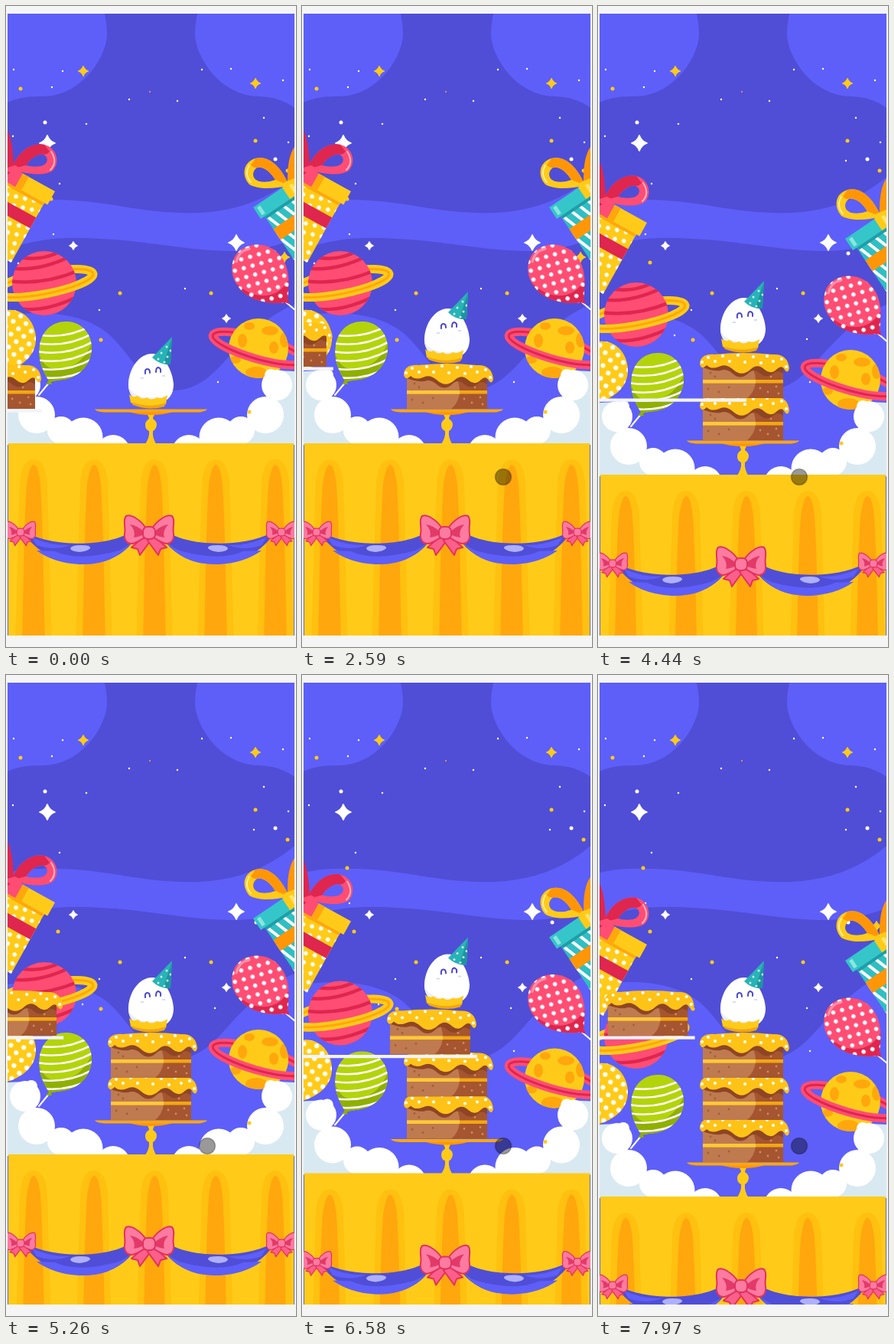
An HTML page that plays this animation: 379 px wide and 837 px high, repeating every 8000 ms.

```html
<!DOCTYPE html>
<html lang="en">
<head>
<meta charset="utf-8">
<title>Cake stack</title>
<style>
html, body { margin: 0; width: 100%; height: 100%; overflow: hidden; background: #f5f5f6; }
svg { display: block; width: 379px; height: 837px; }
</style>
</head>
<body>
<svg id="stage" viewBox="0 0 379 837" xmlns="http://www.w3.org/2000/svg"></svg>
<script>
const LOOP = 8000, LAYER = 55, SLIDE = 249;
const LIGHT = '#5e5ff9', DARK = '#504ed6', GOLD = '#ffcb18', ORANGE = '#ffa70d', PINK = '#ff4d74', RED = '#de264f';

const path = (d, fill, more = '') => `<path d="${d}" fill="${fill}" ${more}/>`;
const line = (d, stroke, w, more = '') => `<path d="${d}" fill="none" stroke="${stroke}" stroke-width="${w}" stroke-linecap="round" ${more}/>`;
const dot = (x, y, r, fill) => `<circle cx="${x}" cy="${y}" r="${r}" fill="${fill}"/>`;
const oval = (x, y, rx, ry, fill, more = '') => `<ellipse cx="${x}" cy="${y}" rx="${rx}" ry="${ry}" fill="${fill}" ${more}/>`;
const rect = (x, y, w, h, fill, more = '') => `<rect x="${x}" y="${y}" width="${w}" height="${h}" fill="${fill}" ${more}/>`;
const group = (body, more = '') => `<g ${more}>${body}</g>`;
const dots = (points, r, fill) => points.map(([x, y]) => dot(x, y, r, fill)).join('');
const spark = (x, y, r, fill) => {
  const k = r * 0.26;
  return path(`M${x} ${y - r}Q${x + k} ${y - k} ${x + r} ${y}Q${x + k} ${y + k} ${x} ${y + r}Q${x - k} ${y + k} ${x - r} ${y}Q${x - k} ${y - k} ${x} ${y - r}Z`,
    fill, `stroke="${fill}" stroke-width="${r * 0.18}" stroke-linejoin="round"`);
};
const clip = (id, shape) => `<clipPath id="${id}">${shape}</clipPath>`;
const polka = (id, size, r, angle) => `<pattern id="${id}" width="${size}" height="${size}" patternUnits="userSpaceOnUse" patternTransform="rotate(${angle})">` +
  dot(size / 4, size / 4, r, '#fff') + dot(size * 0.75, size * 0.75, r, '#fff') + '</pattern>';

const GREEN = 'M57 491C48 477 41 462 44 443C47 423 62 411 80 412C101 413 113 430 112 449C110 470 95 485 74 488Q64 489 57 491Z';
const ROSE = 'M366 387C352 389 329 388 313 376C296 363 291 343 299 327C309 310 333 307 350 318C367 330 371 351 369 370Q369 380 366 387Z';

const defs = `<defs>
  ${clip('screen', rect(2, 10, 375, 812, '#000'))}
  ${clip('green', path(GREEN, '#000'))}
  ${clip('rose', path(ROSE, '#000'))}
  ${clip('redBall', dot(50, 362, 42, '#000'))}
  ${clip('goldBall', dot(330, 447, 39, '#000'))}
  ${clip('front', rect(-90, 0, 180, 60, '#000'))}
  ${clip('sponge', rect(137, 478, 105, 48, '#000'))}
  ${clip('cone', path('M217 373L215 409Q201 410 191 400Z', '#000'))}
  ${polka('big', 17, 3.1, 10)}
  ${polka('mid', 17, 2.8, 29)}
  <pattern id="bars" width="12" height="12" patternUnits="userSpaceOnUse" patternTransform="rotate(-18)">${rect(0, 0, 4, 12, '#fff')}</pattern>
</defs>`;

function sky() {
  const white = [[10, 83], [74, 85], [60, 106], [105, 154], [161, 122], [224, 124], [256, 83], [294, 82], [362, 97], [337, 146],
    [369, 178], [324, 202], [70, 232], [62, 298], [234, 369], [122, 397], [100, 430], [273, 435], [277, 491], [9, 170], [16, 336]];
  const gold = [[19, 108], [326, 176], [368, 215], [59, 252], [68, 335], [149, 375], [268, 375], [124, 436]];
  return rect(2, 10, 375, 812, LIGHT) +
    path('M2 10H377V223C338 257 286 273 226 270C166 268 126 253 60 253Q28 252 2 258Z', DARK) +
    path('M2 10H129Q132 24 132 37C131 68 98 118 48 118Q20 117 2 126Z', LIGHT) +
    path('M377 10H250Q247 24 247 37C248 68 281 118 331 118Q358 119 377 133Z', LIGHT) +
    path('M2 318C40 303 80 301 124 304C190 307 238 320 298 320Q342 319 377 304V390C342 404 322 426 300 448C278 472 258 500 222 502C184 500 170 466 142 436C112 404 60 396 2 404Z', DARK) +
    dots(white, 1.2, '#fff') + dots([[51, 152], [352, 200], [327, 323]], 2.5, '#fff') +
    dots(gold, 2.5, GOLD) + dot(188, 112, 1, ORANGE) +
    spark(101, 85, 6.5, GOLD) + spark(326, 101, 6.5, GOLD) + spark(364, 328, 6.5, GOLD) +
    spark(54, 179, 10, '#fff') + spark(301, 309, 10, '#fff') + spark(88, 313, 5.5, '#fff') + spark(288, 408, 5.5, '#fff');
}

function gifts() {
  const left = group(
    rect(-80, 19, 75, 90, GOLD) + rect(-80, 19, 75, 90, 'url(#mid)') +
    rect(-80, 42, 75, 16, RED) + rect(-80, 18, 75, 6, ORANGE) +
    rect(-80, 0, 80, 20, GOLD) + rect(-80, 0, 32, 20, PINK) + rect(-48, 0, 9, 20, ORANGE),
    'transform="translate(64 242) rotate(29)"') +
    path('M2 162Q10 180 10 215L2 220Z', RED) +
    path('M7 213C16 189 34 178 50 181C66 185 71 203 62 214C52 223 27 220 7 213ZM26 208Q36 211 46 209C56 206 56 197 49 194C42 192 32 199 26 208Z', PINK, 'fill-rule="evenodd"') +
    path('M7 213C16 189 34 178 50 181L57 190Q54 194 49 194C42 192 32 199 26 208Z', RED) +
    line('M59 190Q68 204 58 214', '#ffb3c4', 2) +
    path('M2 211L12 208L22 214L14 221L2 216Z', PINK);
  const right = group(
    rect(6, 17, 80, 100, '#2fbfc2') + rect(6, 17, 80, 100, 'url(#bars)') +
    rect(6, 38, 80, 17, '#ff9607') + rect(6, 17, 80, 5, '#1e9ea8') +
    rect(0, 0, 80, 18, '#35c6c9') + rect(4, 3, 5, 12, '#8be5e0') + rect(46, 0, 30, 18, GOLD) + rect(55, 0, 5, 18, '#ffe46b'),
    'transform="translate(323 263) rotate(-34)"') +
    path('M377 184Q367 198 368 232L377 230Z', '#ff9607') +
    path('M370 234C358 207 342 195 326 199C309 204 308 222 318 233C330 240 350 239 370 234ZM352 227Q342 231 331 229C321 226 321 216 328 211C337 209 346 217 352 227Z', GOLD, 'fill-rule="evenodd"') +
    path('M370 234C358 207 342 195 326 199L320 208Q324 212 328 211C337 209 346 217 352 227Z', '#ff9607') +
    line('M318 208Q311 220 320 230', '#ffec9a', 2) +
    path('M377 225L364 230L361 237L377 231Z', GOLD);
  return left + right;
}

function planets() {
  const ring = (cx, cy, tilt, rx, ry, main, inner) => {
    const hoop = oval(0, 0, rx, ry, 'none', `stroke="${main}" stroke-width="11"`) +
      oval(0, 0, rx, ry, 'none', `stroke="${inner}" stroke-width="3"`);
    const place = `transform="translate(${cx} ${cy}) rotate(${tilt})"`;
    return [group(hoop, place), group(group(hoop, 'clip-path="url(#front)"'), place)];
  };
  const [backA, frontA] = ring(50, 362, -11, 65, 14, GOLD, ORANGE);
  const [backB, frontB] = ring(330, 447, 16, 62, 14, PINK, RED);
  const bands = line('M4 342Q40 348 84 327M18 328Q46 334 74 319M4 359Q50 365 96 345M8 394Q48 402 92 380', RED, 4.5);
  const spots = oval(309, 437, 6, 9, ORANGE) + oval(345, 424, 11, 6, ORANGE) + oval(350, 446, 6, 8, ORANGE) +
    oval(327, 479, 14, 8, ORANGE) + oval(318, 418, 7, 5, ORANGE) + oval(364, 436, 6, 10, ORANGE) + oval(300, 462, 7, 5, ORANGE);
  return backA + dot(50, 362, 42, PINK) + group(bands, 'clip-path="url(#redBall)"') + frontA +
    backB + dot(330, 447, 39, GOLD) + group(spots, 'clip-path="url(#goldBall)"') + frontB;
}

function balloons() {
  const yellow = 'M2 397C24 395 39 414 39 435C39 456 22 470 2 476Z';
  let stripes = '';
  for (let i = 0; i < 6; i++) stripes += line(`M40 ${429 + i * 11}Q80 ${436 + i * 11} 116 ${415 + i * 11}`, '#fff', 2.6);
  return path(yellow, GOLD) + path(yellow, 'url(#big)') +
    line('M57 491L43 508', '#fff', 2) + path('M57 488L52 494L60 494Z', '#8fae00') + path(GREEN, '#b3d40a') +
    group(path('M40 440Q46 475 66 474Q98 474 112 440V500H40Z', '#8fb000') + stripes, 'clip-path="url(#green)"') +
    line('M366 387L379 398', '#fff', 2) + path('M362 386L369 383L370 389Z', RED) + path(ROSE, PINK) +
    group(path('M290 350Q316 384 346 377Q364 372 373 350V395H290Z', RED) + rect(290, 305, 85, 90, 'url(#mid)') +
      line('M301 334Q304 320 318 317', '#ff91a9', 3), 'clip-path="url(#rose)"');
}

function clouds() {
  const puffs = path('M2 477L24 476L45 525L70 545L85 560V573H2Z', '#d9e9f1') +
    dot(25, 495, 20, '#fff') + dot(33, 482, 8, '#fff') + dot(40, 534, 24, '#fff') +
    dot(72, 554, 18, '#fff') + dot(101, 563, 25.5, '#fff') + dot(140, 582, 22, '#fff');
  return puffs + group(puffs, 'transform="translate(379) scale(-1 1)"') + dot(318, 530, 2.5, GOLD);
}

function stand() {
  return path('M183 531H196Q192 536 192 539Q197 542 197 547Q196 553 192 555Q191 564 197 573H181Q188 564 187 555Q182 553 182 547Q182 542 187 539Q187 536 183 531Z', GOLD) +
    path('M158 529H221Q207 534 190 534Q171 534 158 529Z', '#ff9607') +
    path('M116 526.5H263Q261 530 250 530.5H129Q118 530 116 526.5Z', ORANGE);
}

function bow(x, y, s) {
  const half = path('M-5 3L-23 19L-15 21L-12 29L2 10Z', '#fb5f8b') +
    path('M-4 -6C-11 -17 -24 -25 -30 -22C-35 -17 -30 -8 -32 1C-33 9 -29 15 -22 14C-14 12 -9 8 -4 5Z', '#fd7aa1') +
    path('M-6 -1Q-16 -10 -25 -11Q-17 -3 -20 6Q-11 5 -6 1Z', '#e23a68', 'stroke="none"');
  const ink = 'stroke="#e0325f" stroke-width="2" stroke-linejoin="round"';
  return group(group(half, ink) + group(half, ink + ' transform="scale(-1 1)"') +
    rect(-8, -8, 16, 16, '#fd7aa1', 'rx="6" ' + ink), `transform="translate(${x} ${y}) scale(${s})"`);
}

function table() {
  let folds = '';
  for (const x of [36, 115, 194, 274, 352])
    folds += path(`M${x - 24} 835C${x - 22} 770 ${x - 20} 690 ${x - 18} 622Q${x - 15} 592 ${x} 592Q${x + 15} 592 ${x + 18} 622C${x + 20} 690 ${x + 22} 770 ${x + 24} 835Z`, '#ffc010') +
      path(`M${x - 15} 835C${x - 13} 740 ${x - 12} 670 ${x - 9} 625Q${x - 5} 599 ${x} 599Q${x + 6} 599 ${x + 9} 625C${x + 12} 670 ${x + 13} 740 ${x + 15} 835Z`, ORANGE);
  const swag = path('M24 686C56 706 132 708 164 686L168 696C142 739 62 741 26 692Z', DARK) +
    path('M64 712Q94 726 148 711Q160 705 165 699Q142 731 95 729Q62 727 40 711Z', LIGHT) +
    path('M34 694Q58 705 84 704Q62 712 40 704Z', LIGHT) +
    path('M84 708Q86 704 97 704Q111 704 110 708Q107 712 96 713Q84 712 84 708Z', '#aeb0ff');
  return rect(3, 571, 373, 270, GOLD) + folds + swag + group(swag, 'transform="translate(374) scale(-1 1)"') +
    bow(19, 687, 0.61) + bow(187, 688, 1) + bow(360, 687, 0.61);
}

function cake() {
  const sponge = rect(137, 478, 105, 48, '#a5552f') +
    path('M137 478H196Q207 490 206 506Q204 519 195 526H137Z', '#bf7a4f') +
    rect(137, 502, 105, 4.5, '#f2a713') + rect(137, 502, 69, 4.5, '#ffc83a') +
    path('M137 478H242V494Q234 488 229 494Q221 501 212 494Q204 486 196 494Q186 503 176 494Q168 487 160 490Q150 491 137 486Z', '#8e4525') +
    dots([[147, 493], [153, 498], [144, 514], [158, 518], [171, 512]], 1.4, '#a0603b') +
    dots([[212, 513], [222, 518], [233, 511], [236, 520], [226, 498]], 1.4, '#cf8a5f');
  const icing = path('M133 482C133 472 141 468 152 469Q190 465 228 469C243 468 249 476 250 487Q248 495 244 489Q240 482 234 488Q226 496 218 489Q209 480 200 488Q188 499 177 489Q167 480 158 485Q148 489 142 483Q136 490 133 482Z', '#ffc317') +
    dots([[136, 479], [144, 473], [153, 478], [163, 471], [172, 478], [183, 470], [192, 479], [203, 472], [213, 480], [221, 471], [229, 478], [240, 475], [246, 485]], 2.1, '#fff');
  return group(sponge, 'clip-path="url(#sponge)"') + icing;
}

function egg() {
  return path('M191 395C206 395 218 417 219 435C219 453 207 461 190 461C171 461 159 450 160 434C161 414 174 395 191 395Z', '#fff') +
    path('M160 438Q170 458 212 450Q205 461 188 461Q163 460 160 438Z', '#eceefa') +
    path('M161 448Q166 453 172 450Q178 456 184 452Q190 457 197 452Q203 455 211 449L209 461Q188 471 163 459Z', GOLD) +
    path('M163 458Q188 467 209 459L207 464Q187 470 166 462Z', '#f2a50f') +
    line('M182 421Q181 415 185 415Q188 415 188 420M196 419Q196 413 199 413Q203 414 202 419', '#4a45cf', 2) +
    oval(178, 427, 2.5, 1, '#d5d8f3') + oval(206, 424, 2.5, 1, '#d5d8f3') +
    path('M217 373L215 409Q201 410 191 400Z', '#28b3b6') +
    group(path('M217 373L215 409Q209 411 206 408Z', '#1c959f') +
      dots([[210, 386], [203, 394], [211, 399], [199, 402], [207, 406], [215, 391]], 1.5, '#c9f4ef'), 'clip-path="url(#cone)"');
}

const layers = [0, 1, 2, 3];
const stage = document.getElementById('stage');
stage.innerHTML = defs + group(
  sky() +
  group(gifts() + planets() + balloons() + clouds() + stand() + table() +
    layers.map(i => rect(-60, 526.5, 311, 4.2, '#f3f4fb', `id="plate${i}"`) + group(cake(), `id="cake${i}"`)).join(''), 'id="world"') +
  group(egg(), 'id="egg"') +
  '<circle id="touch" cx="263" cy="615" r="10.5" fill="#000" stroke="#000" stroke-opacity=".25" stroke-width="1.6"/>',
  'clip-path="url(#screen)"');

const $ = id => document.getElementById(id);
const el = { world: $('world'), egg: $('egg'), touch: $('touch'), cakes: layers.map(i => $('cake' + i)), plates: layers.map(i => $('plate' + i)) };
const clamp = v => Math.max(0, Math.min(1, v));
const move = (node, x, y) => node.setAttribute('transform', `translate(${x.toFixed(2)} ${y.toFixed(2)})`);

// Each slide: start time and duration. Each jump: start time, rest height before and after.
const slides = [[-437, 2417], [2260, 2120], [4632, 2138], [6910, 2120]];
const jumps = [[984, 59, 0], [3483, 0, -55], [5747, -55, -110]];
const scrolls = [4180, 6425];
const RISE = 340, HEIGHT = 123, SCROLL = 350, RETRACT = 280;

function eggHeight(t) {
  let y = jumps[0][1];
  for (const [start, from, to] of jumps) {
    if (t < start) break;
    const u = (t - start) / RISE - 1;
    const air = from - HEIGHT * (1 - u * u);
    y = u > 0 ? Math.min(air, to) : air;
  }
  return y;
}

function render(t) {
  const shift = scrolls.reduce((sum, at) => sum + LAYER * clamp((t - at) / SCROLL), 0);
  move(el.world, 0, shift);
  move(el.egg, 0, eggHeight(t) + shift);
  slides.forEach(([start, time], i) => {
    const x = SLIDE * (clamp((t - start) / time) - 1);
    const back = clamp((t - start - time) / RETRACT);
    const shown = t >= start ? 'visible' : 'hidden';
    move(el.cakes[i], x, -LAYER * i);
    move(el.plates[i], x - 262 * back, -LAYER * i);
    el.cakes[i].setAttribute('visibility', shown);
    el.plates[i].setAttribute('visibility', back < 1 ? shown : 'hidden');
  });
  const pressed = jumps.some(([start]) => t > start - 150 && t < start + 60);
  el.touch.setAttribute('visibility', t >= 870 ? 'visible' : 'hidden');
  el.touch.setAttribute('fill-opacity', pressed ? 0.5 : 0.4);
}

function tick() {
  render(performance.now() % LOOP);
  requestAnimationFrame(tick);
}
tick();
</script>
</body>
</html>
```
